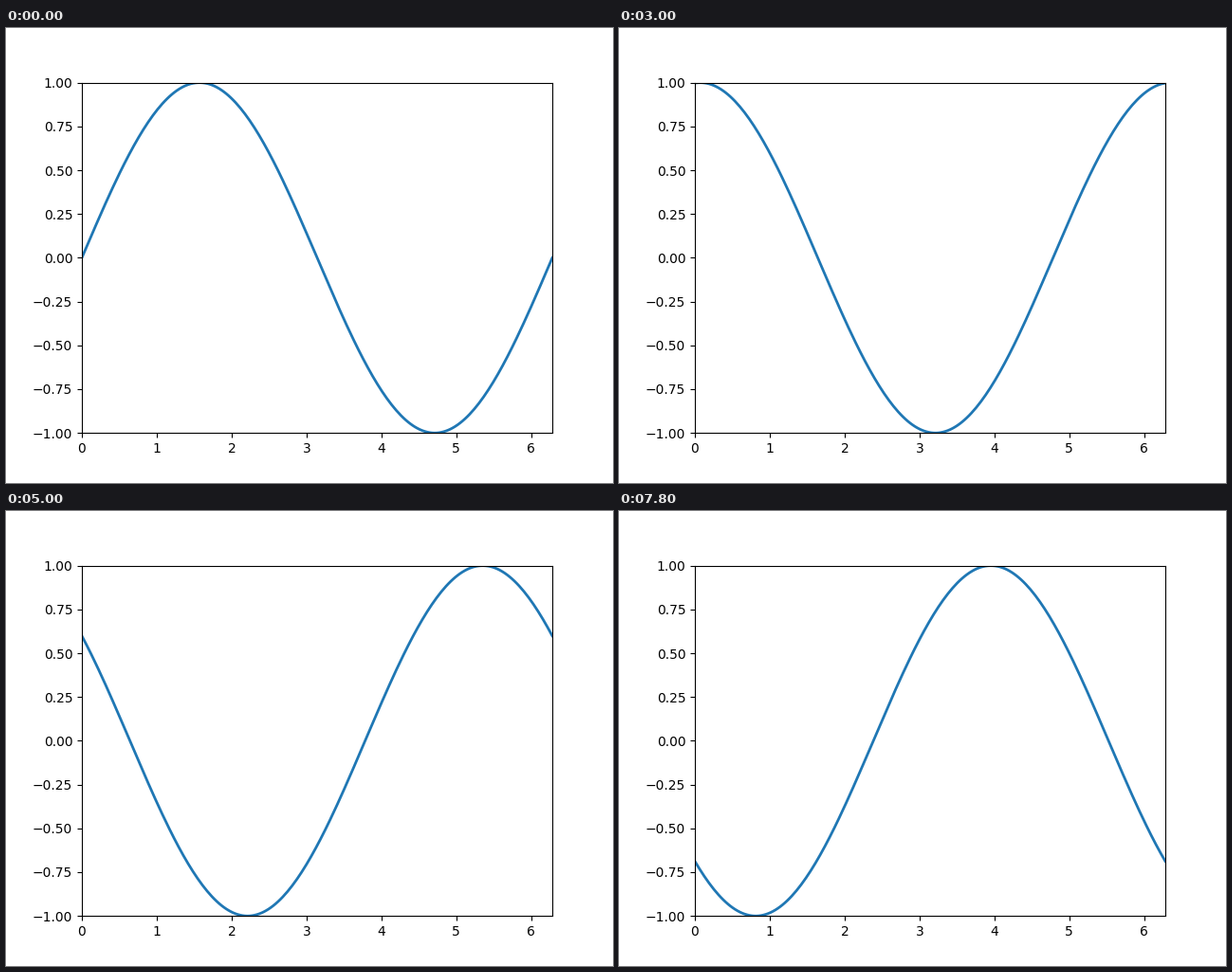
Recreate the animation shown at these times as a matplotlib script. Size 640 px wide and 480 px high, loop 8000 ms.

```python
import numpy as np
import matplotlib.pyplot as plt
from matplotlib.animation import FuncAnimation

FRAMES = 40
INTERVAL = 200  # ms
PHASE_STEP = 0.1  # radians per frame

fig, ax = plt.subplots(figsize=(6.4, 4.8), dpi=100)
ax.set_xlim(0, 2 * np.pi)
ax.set_ylim(-1, 1)

x = np.linspace(0, 2 * np.pi, 200)
line, = ax.plot(x, np.sin(x), color="#1f77b4", lw=2)


def update(frame):
    line.set_ydata(np.sin(x + PHASE_STEP * frame))
    return line,


def init():
    return update(0)


anim = FuncAnimation(fig, update, frames=FRAMES, init_func=init,
                     interval=INTERVAL, repeat=True, repeat_delay=0)
plt.show()
```
